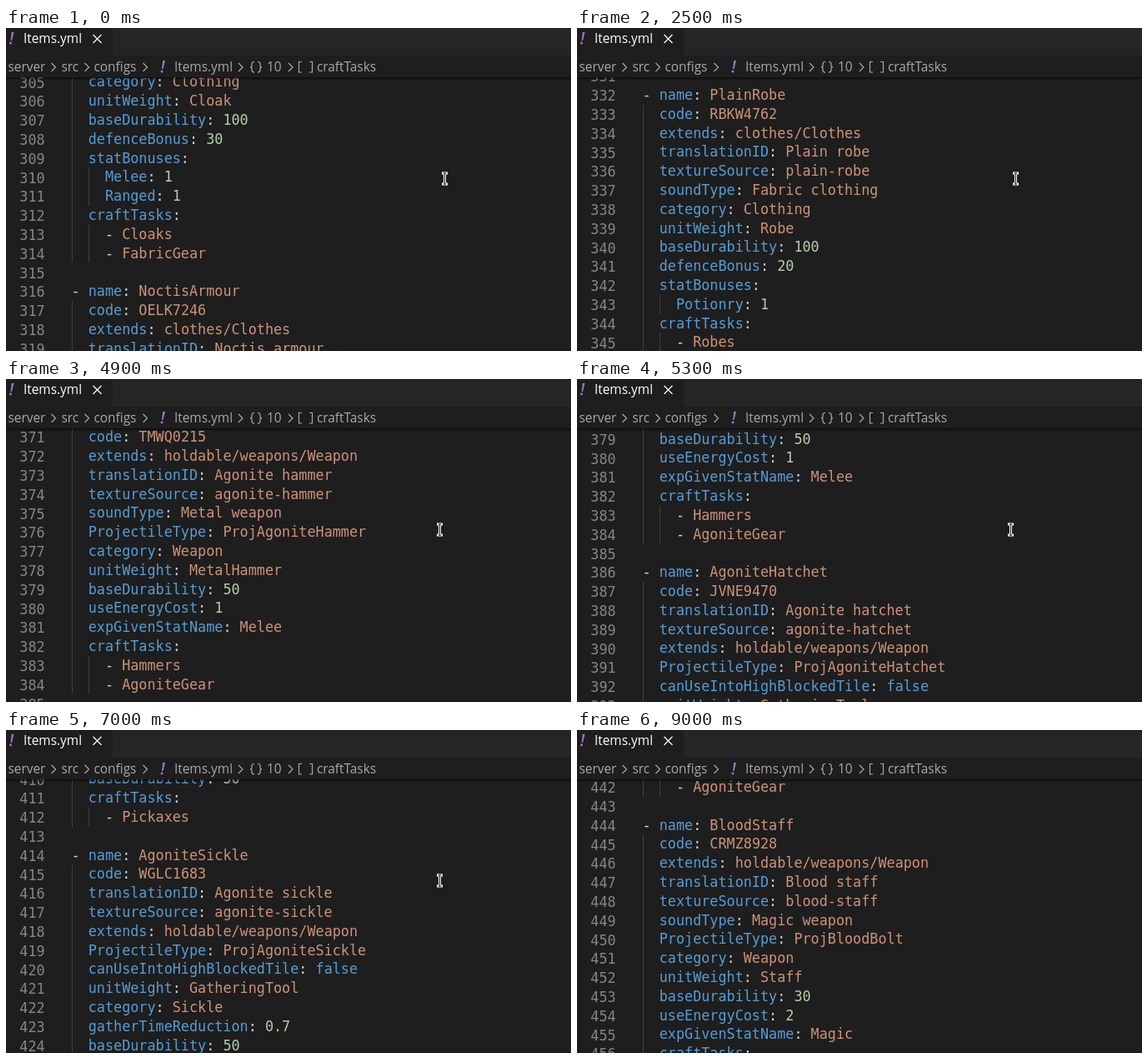
An HTML page that plays this animation: 678x387 px, repeating every 9.4 s.

```html
<!DOCTYPE html>
<html lang="en">
<head>
<meta charset="utf-8">
<title>Items.yml</title>
<style>
  html, body { margin: 0; width: 100%; height: 100%; overflow: hidden; background: #1e1e1e; }
  #stage { position: relative; width: 678px; height: 387px; overflow: hidden; background: #1e1e1e; }
  #editor { position: absolute; top: 59px; left: 0; width: 678px; height: 328px; overflow: hidden;
    font: 16.8px/22.8px "DejaVu Sans Mono", monospace; color: #d4d4d4; }
  #editor::after { content: ""; position: absolute; top: 0; left: 0; width: 100%; height: 4px;
    background: linear-gradient(#0008, #0000); }
  #lines { position: absolute; left: 0; }
  .line { position: absolute; left: 78.5px; height: 22.8px; white-space: pre; }
  .no { position: absolute; top: 1.2px; left: -62.2px; color: #858585; }
  .guide { position: absolute; top: 0; width: 1px; height: 100%; background: #404040; }
  .key { color: #569cd6; }
  .text { color: #ce9178; }
  .number { color: #b5cea8; }
  svg { position: absolute; top: 0; left: 0; font: 15.4px "Open Sans", sans-serif; }
</style>
</head>
<body>
<div id="stage">
  <div id="editor"><div id="lines"></div></div>
  <svg width="678" height="387" fill="none">
    <defs>
      <path id="chevron" d="M-2.5-5 2.5 0-2.5 5"/>
      <g id="bang" fill="#a074c4">
        <path d="M.2-8H3L.5 2.2H-1Z"/>
        <circle cx="-1" cy="5" r="1.5"/>
      </g>
    </defs>
    <path fill="#252526" d="M128 0H678V33H128Z"/>
    <use href="#bang" x="6.5" y="13"/>
    <text x="21" y="18" fill="#fff">Items.yml</text>
    <path d="M104.500 8l10 10m0-10-10 10" stroke="#fff" stroke-width="1.2"/>
    <g fill="#a9a9a9">
      <text x="2.500" y="52">server</text>
      <text x="66.500" y="52">src</text>
      <text x="105.500" y="52">configs</text>
      <text x="202" y="52">Items.yml</text>
      <text x="313" y="52">10</text>
      <text x="373" y="52">craftTasks</text>
    </g>
    <use href="#bang" x="188" y="47"/>
    <g stroke="#a9a9a9" stroke-width="1.2">
      <use href="#chevron" x="57" y="47"/>
      <use href="#chevron" x="97" y="47"/>
      <use href="#chevron" x="167" y="47"/>
      <use href="#chevron" x="281.500" y="47"/>
      <use href="#chevron" x="341.500" y="47"/>
      <path d="M298 40.500q-3 0-3 2.500v2q0 1.800-2 1.800 2 0 2 1.800v2q0 2.500 3 2.500M302 40.500q3 0 3 2.500v2q0 1.800 2 1.800-2 0-2 1.800v2q0 2.500-3 2.500"/>
      <path d="M355 40.500h-3.500v12.500h3.500M364 40.500h3.500v12.500H364"/>
    </g>
    <g id="cursor">
      <g id="beam" stroke-linecap="square">
        <path d="M-2-6.500H2M0-6.500V6.500M-2 6.500H2" stroke="#fff" stroke-width="3"/>
        <path d="M-1.500-6.500H1.500M0-6.500V6.500M-1.500 6.500H1.500" stroke="#1e1e1e"/>
      </g>
      <path id="arrow" d="M0 0V14L3.500 11 6 16 8 15 5.800 10.200H10Z" fill="#111" stroke="#fff"/>
    </g>
  </svg>
</div>
<script>
const LOOP = 9400, FIRST_LINE = 305, LINE_HEIGHT = 22.8, NOTCH = 60;
const $ = id => document.getElementById(id);

const clothing = (name, code, label, slug, sound, weight, defence, stat, tasks) => `- name: ${name}
  code: ${code}
  extends: clothes/Clothes
  translationID: ${label}
  textureSource: ${slug}
  soundType: ${sound} clothing
  category: Clothing
  unitWeight: ${weight}
  baseDurability: 100
  defenceBonus: ${defence}
  statBonuses:
    ${stat}: 1
  craftTasks:
    - ${tasks[0]}
    - ${tasks[1]}
`;

const weapon = (material, kind, code, { sound = 'Metal', shot = material + kind, weight = 'Metal' + kind,
  durability = 50, cost = 1, stat = 'Melee' } = {}) => `- name: ${material}${kind}
  code: ${code}
  extends: holdable/weapons/Weapon
  translationID: ${material} ${kind.toLowerCase()}
  textureSource: ${(material + '-' + kind).toLowerCase()}
  soundType: ${sound} weapon
  ProjectileType: Proj${shot}
  category: Weapon
  unitWeight: ${weight}
  baseDurability: ${durability}
  useEnergyCost: ${cost}
  expGivenStatName: ${stat}
  craftTasks:
    - ${kind}s
    - ${material}Gear
`;

const tool = (kind, code) => `- name: Agonite${kind}
  code: ${code}
  translationID: Agonite ${kind.toLowerCase()}
  textureSource: agonite-${kind.toLowerCase()}
  extends: holdable/weapons/Weapon
  ProjectileType: ProjAgonite${kind}
  canUseIntoHighBlockedTile: false
  unitWeight: GatheringTool
  category: ${kind}
  gatherTimeReduction: 0.7
  baseDurability: 50
  craftTasks:
    - ${kind}s
`;

const source = [
`  category: Clothing
  unitWeight: Cloak
  baseDurability: 100
  defenceBonus: 30
  statBonuses:
    Melee: 1
    Ranged: 1
  craftTasks:
    - Cloaks
    - FabricGear
`,
  clothing('NoctisArmour', 'OELK7246', 'Noctis armour', 'noctis-armour', 'Metal', 'MetalArmour', 50, 'Melee', ['Armour', 'NoctisGear']),
  clothing('PlainRobe', 'RBKW4762', 'Plain robe', 'plain-robe', 'Fabric', 'Robe', 20, 'Potionry', ['Robes', 'FabricGear']),
`- name: AgoniteOre
  code: KDTM3158
  translationID: Agonite ore
  textureSource: agonite-ore
  unitWeight: Ore
`,
  weapon('Agonite', 'Dagger', 'HZQA6031'),
  weapon('Agonite', 'Hammer', 'TMWQ0215'),
  tool('Hatchet', 'JVNE9470'),
  tool('Pickaxe', 'UXBP5028'),
  tool('Sickle', 'WGLC1683'),
  weapon('Agonite', 'Sword', 'PYFS2594'),
  weapon('Blood', 'Staff', 'CRMZ8928', { sound: 'Magic', shot: 'BloodBolt', weight: 'Staff', durability: 30, cost: 2, stat: 'Magic' }),
].join('\n');

const span = (type, text) => `<span class="${type}">${text}</span>`;

function valueType(value) {
  if (value === 'false') return 'key';
  return /^[\d.]+$/.test(value) ? 'number' : 'text';
}

function renderLine(line, i) {
  const [, indent, dash = '', key, value] = line.match(/^( *)(- )?(?:(\w+):)? ?(.*)$/);
  let guides = '';
  for (let col = 0; col < indent.length; col += 2)
    guides += `<i class="guide" style="left:${(0.5 + col * 10.11).toFixed(1)}px"></i>`;
  const code = indent + dash + (key ? span('key', key) + ': ' : '') + span(valueType(value), value);
  return `<div class="line" style="top:${(i * LINE_HEIGHT).toFixed(1)}px">` +
    `${guides}<span class="no">${FIRST_LINE + i}</span>${code}</div>`;
}
$('lines').innerHTML = source.split('\n').map(renderLine).join('');

// Wheel bursts: start time, then notches turned in each following 100 ms
const bursts = [
  [600, 1, 1], [1100, 1], [1900, 1, 2, 2, 1], [2500, 1],
  [2900, 2, 2, 2, 2, 1], [4100, 1], [4300, 1, 2, 1],
  [4900, 1, 1, 1, .5, .5], [5800, 1, 1], [6100, 4],
  [6600, 2, 2, 1], [7000, 1], [7400, 2, 2], [7700, 2], [8100, 2, 2, 2],
];

function scrollAt(t) {
  let notches = 0;
  for (const [start, ...turns] of bursts)
    turns.forEach((n, i) => { if (t >= start + i * 100) notches += n; });
  return notches * NOTCH;
}

function cursorAt(t) {
  if (t < 4700) return [526.5, 180.5];
  const k = Math.max(0, (t - 8400) / 500);
  return [520.5 - 421.5 * k, 180.5 - 178.5 * k];
}

function draw(now) {
  const t = Math.floor(now % LOOP / 100) * 100;
  $('lines').style.top = -5.6 - scrollAt(t) + 'px';
  const [x, y] = cursorAt(t), overText = y > 59;
  $('cursor').setAttribute('transform', `translate(${x} ${y})`);
  $('cursor').style.display = t < 9000 ? '' : 'none';
  $('beam').style.display = overText ? '' : 'none';
  $('arrow').style.display = overText ? 'none' : '';
  requestAnimationFrame(draw);
}
draw(performance.now());
</script>
</body>
</html>
```
